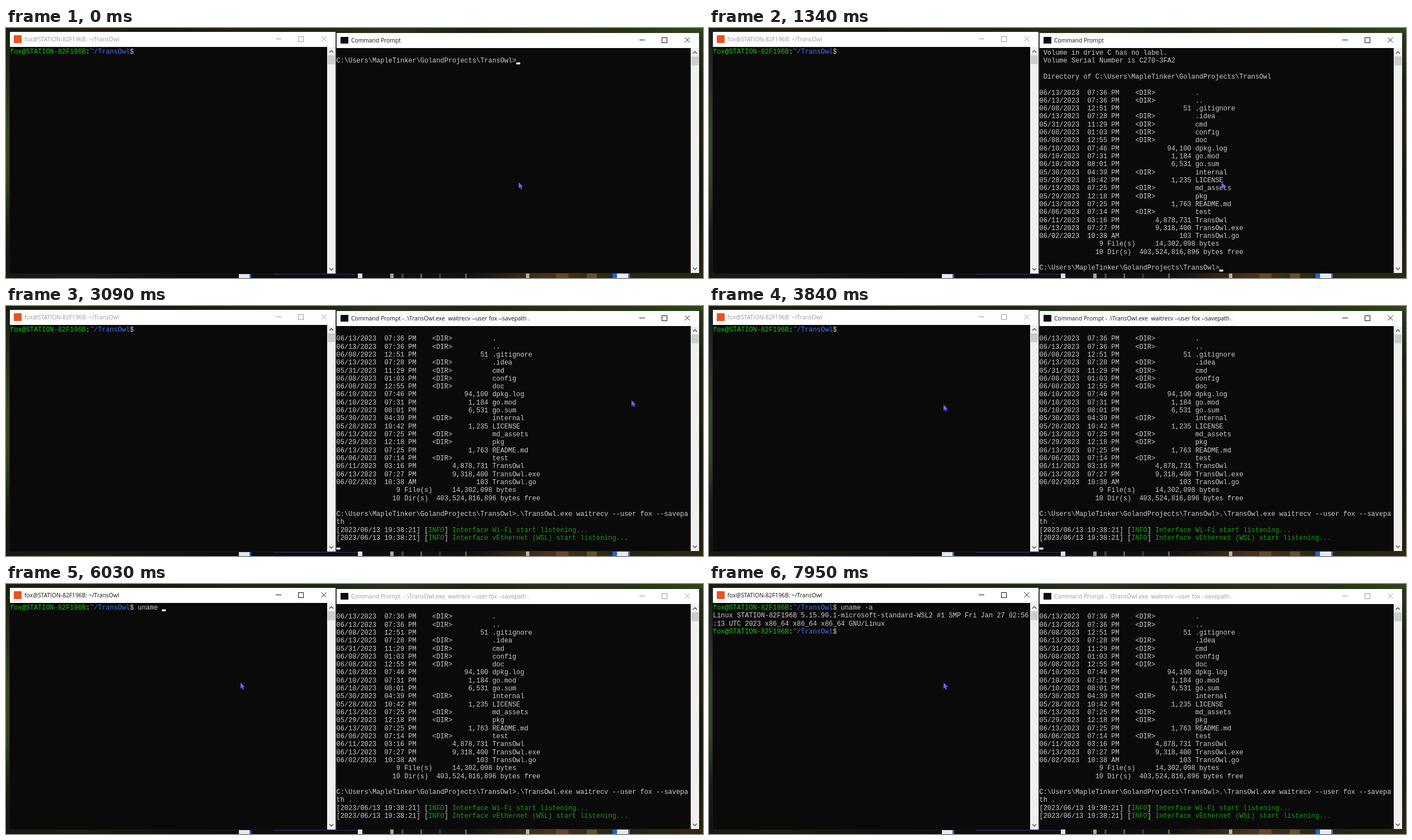
Animation, 1248 px wide and 449 px high, one loop 7.99 s. Source, as an HTML page with a canvas:

```html
<!DOCTYPE html>
<html lang="en">
<head>
<meta charset="utf-8">
<title>Two terminals</title>
<style>
html, body { margin: 0; width: 100%; height: 100%; overflow: hidden; background: #15150c; }
canvas { display: block; }
</style>
</head>
<body>
<canvas id="stage" width="1248" height="449"></canvas>
<script>
const g = document.getElementById('stage').getContext('2d');
const LOOP = 7990, CELL_W = 7.158, ROW_H = 14.31, BLINK = 530;
const GREY = '#cccccc', GREEN = '#16c60c', BLUE = '#3b78ff', LOG = '#13a10e';

// Moments of the story, in ms
const DIR_RUN = 1080, RECALL = 1950, RECV_RUN = 2600, LISTEN = 2650, FOCUS = 3900, UNAME_RUN = 6340;
const dirKeys = [500, 650, 800];
const unameKeys = [5400, 5520, 5640, 5760, 5870, 5980, 6130, 6230];
const mousePath = [[0, 918, 277], [2680, 918, 277], [3080, 1120, 169], [3120, 1120, 169], [3780, 420, 177], [LOOP, 420, 177]];

const host = 'STATION-82F196B';
const cmdPrompt = 'C:\\Users\\MapleTinker\\GolandProjects\\TransOwl>';
const recv = '.\\TransOwl.exe waitrecv --user fox --savepath .';
const entries = `0613 07:36 <DIR> .
0613 07:36 <DIR> ..
0608 12:51 51 .gitignore
0613 07:28 <DIR> .idea
0531 11:29 <DIR> cmd
0608 01:03 <DIR> config
0608 12:55 <DIR> doc
0610 07:46 94,100 dpkg.log
0610 07:31 1,184 go.mod
0610 08:01 6,531 go.sum
0530 04:39 <DIR> internal
0528 10:42 1,235 LICENSE
0613 07:25 <DIR> md_assets
0529 12:18 <DIR> pkg
0613 07:25 1,763 README.md
0606 07:14 <DIR> test
0611 03:16 4,878,731 TransOwl
0613 07:27 9,318,400 TransOwl.exe
0602 10:38 103 TransOwl.go`.split('\n').map(line => {
  const [date, time, size, name] = line.split(' ');
  const half = time === '10:38' ? 'AM' : 'PM';
  const middle = size === '<DIR>' ? '    <DIR>'.padEnd(18) : size.padStart(18);
  return `${date.slice(0, 2)}/${date.slice(2)}/2023  ${time} ${half}${middle} ${name}`;
});
const listing = [
  ' Volume in drive C has no label.', ' Volume Serial Number is C270-3FA2', '',
  ' Directory of ' + cmdPrompt.slice(0, -1), '', ...entries,
  '9'.padStart(16) + ' File(s) ' + '14,302,098'.padStart(14) + ' bytes',
  '10'.padStart(16) + ' Dir(s)  403,524,816,896 bytes free', ''
];
const logLine = name => [['[2023/06/13 19:38:21] [', GREY], ['INFO', LOG], ['] ', GREY],
  [`Interface ${name} start listening...`, LOG]];

const plain = text => [[text, GREY]];
const wrap = (text, cols) => [text.slice(0, cols), text.slice(cols)].filter((s, i) => !i || s);
const typed = (text, keys, t) => text.slice(0, keys.filter(k => k <= t).length);
const lineLength = line => line.reduce((n, [s]) => n + s.length, 0);
const lastBefore = (times, t) => Math.max(0, ...times.filter(k => k <= t));

function rect(x, y, w, h, color) {
  g.fillStyle = color;
  g.fillRect(x, y, w, h);
}

function stroke(color, ...paths) {
  g.strokeStyle = color;
  g.beginPath();
  for (const p of paths) p.forEach(([x, y], i) => i ? g.lineTo(x, y) : g.moveTo(x, y));
  g.stroke();
}

function gradient(x, y, w, h, colors) {
  const fill = w > h ? g.createLinearGradient(x, 0, x + w, 0) : g.createLinearGradient(0, y, 0, y + h);
  colors.forEach((c, i) => fill.addColorStop(i / (colors.length - 1), c));
  rect(x, y, w, h, fill);
}

function wallpaper() {
  gradient(0, 0, 1248, 10, ['#18200d', '#25200f', '#19180d', '#272210', '#1b2911', '#27331a', '#1b2310', '#302b15', '#243415', '#31451b']);
  gradient(0, 8, 8, 441, ['#17200c', '#26301a', '#39451f', '#36431d', '#18200d', '#11150b']);
  gradient(1240, 8, 8, 441, ['#29381a', '#1a2011', '#24200f', '#151a0d', '#1d1d0f', '#2a240f']);
  gradient(0, 440, 1248, 9, ['#181a0b', '#201d0d', '#13130a', '#0d0d0c', '#0c0c0e', '#100f0e', '#15110d', '#49341c', '#23260f', '#30270f']);
  const scraps = [[417, 19, '#e7e9ef'], [436, 3, '#1767d5'], [630, 8, '#dfe2e8'], [688, 6, '#aaa88b'],
    [708, 4, '#4b4138'], [742, 3, '#68604c'], [775, 4, '#363048'], [822, 3, '#6b6045'], [931, 6, '#b8b49b'],
    [985, 22, '#68491d'], [1040, 18, '#685023'], [1086, 8, '#1767d5'], [1094, 20, '#e7e9ef'], [1114, 3, '#3a75bd']];
  for (const [x, w, color] of scraps) rect(x, 441, w, 8, color);
  rect(478, 442, 152, 1, '#26365c');
}

function windowFrame(x, y, w, bottom, title, active, icon) {
  const ink = active ? '#111111' : '#999999', right = x + w, mid = y + 12.5, bar = y + 27;
  rect(x, y, w, bottom - y, '#0a0a0a');
  rect(x, y, w, 27, '#ffffff');
  rect(...icon);
  g.fillStyle = ink;
  g.font = '10.3px "Open Sans", "Noto Sans", sans-serif';
  g.fillText(title, x + 26, mid + 4);
  g.lineWidth = 1;
  const min = right - 102, max = right - 62, close = right - 21;
  stroke(ink, [[min - 5, mid], [min + 5, mid]],
    [[close - 4.5, mid - 4.5], [close + 4.5, mid + 4.5]], [[close + 4.5, mid - 4.5], [close - 4.5, mid + 4.5]]);
  g.strokeRect(max - 4.5, mid - 4, 9, 9);

  rect(right - 15, bar, 15, bottom - bar, '#f0f0f0');
  rect(right - 14, bar + 15, 13, 16, '#cdcdcd');
  const cx = right - 7.5;
  g.lineWidth = 1.5;
  for (const [cy, dir] of [[bar + 8, -1], [bottom - 7.5, 1]])
    stroke('#505050', [[cx - 3.5, cy - 2 * dir], [cx, cy + 1.5 * dir], [cx + 3.5, cy - 2 * dir]]);
}

function terminal(x, y, lines, cursorOn) {
  const shown = lines.slice(-28);
  g.font = '12px "Liberation Mono", monospace';
  shown.forEach((line, row) => {
    let col = 0;
    for (const [text, color] of line) {
      g.fillStyle = color;
      for (const ch of text) {
        const lift = ch === '~' ? 4 : 0;
        if (ch !== ' ') g.fillText(ch, x + col * CELL_W, y + row * ROW_H + 11 - lift);
        col++;
      }
    }
  });
  if (!cursorOn) return;
  const last = shown.length - 1;
  rect(x + lineLength(shown[last]) * CELL_W, y + last * ROW_H + 10.5, 7, 3.5, '#f2f2f2');
}

function cmdLines(t) {
  const first = cmdPrompt + typed('dir', dirKeys, t);
  if (t < DIR_RUN) return ['', first].map(plain);
  const command = wrap(cmdPrompt + (t >= RECALL ? recv : ''), 88);
  const lines = ['', first, ...listing, ...command].map(plain);
  if (t >= LISTEN) lines.push(logLine('Wi-Fi'), logLine('vEthernet (WSL)'));
  if (t >= RECV_RUN) lines.push(plain(''));
  return lines;
}

function shellLines(t) {
  const prompt = [[`fox@${host}`, GREEN], [':', GREY], ['~/TransOwl', BLUE], ['$ ', GREY]];
  const lines = [[...prompt, [typed('uname -a', unameKeys, t), GREY]]];
  if (t >= UNAME_RUN) {
    const info = `Linux ${host} 5.15.90.1-microsoft-standard-WSL2 #1 SMP Fri Jan 27 02:56:13 UTC 2023 x86_64 x86_64 x86_64 GNU/Linux`;
    lines.push(...wrap(info, 79).map(plain), prompt);
  }
  return lines;
}

function pointer(t) {
  const i = mousePath.findIndex(p => p[0] > t);
  const [t0, x0, y0] = mousePath[i - 1], [t1, x1, y1] = mousePath[i];
  const u = (t - t0) / (t1 - t0), k = u * u * (3 - 2 * u);
  g.save();
  g.translate(x0 + (x1 - x0) * k, y0 + (y1 - y0) * k);
  g.fillStyle = '#7560ff';
  g.fill(new Path2D('M0 0V11L2.4 8.8L4.2 12.8L6 12L4.3 8.1H7.6Z'));
  g.restore();
}

function draw(t) {
  const left = t >= FOCUS;
  const blink = times => (t - lastBefore(times, t)) % (2 * BLINK) < BLINK;
  wallpaper();
  rect(6, 7, 585, 435, '#17173f');
  windowFrame(7, 7, 583, 441, `fox@${host}: ~/TransOwl`, left, [14, 13, 14, 14, '#e95420']);
  terminal(7, 35, shellLines(t), left && blink([FOCUS, ...unameKeys, UNAME_RUN]));

  const running = t >= RECV_RUN ? ' - ' + recv.replace(' ', '\u00a0 ') : '';
  rect(590, 8, 2, 433, '#303030');
  windowFrame(592, 9, 649, 440, 'Command Prompt' + running, !left, [599, 16, 14, 12, '#0c0c0c']);
  terminal(591.5, 37, cmdLines(t), !left && blink([...dirKeys, DIR_RUN, RECALL, RECV_RUN, LISTEN]));
  pointer(t);
}

const start = performance.now();
function tick() {
  draw((performance.now() - start) % LOOP);
  requestAnimationFrame(tick);
}
tick();
</script>
</body>
</html>
```
